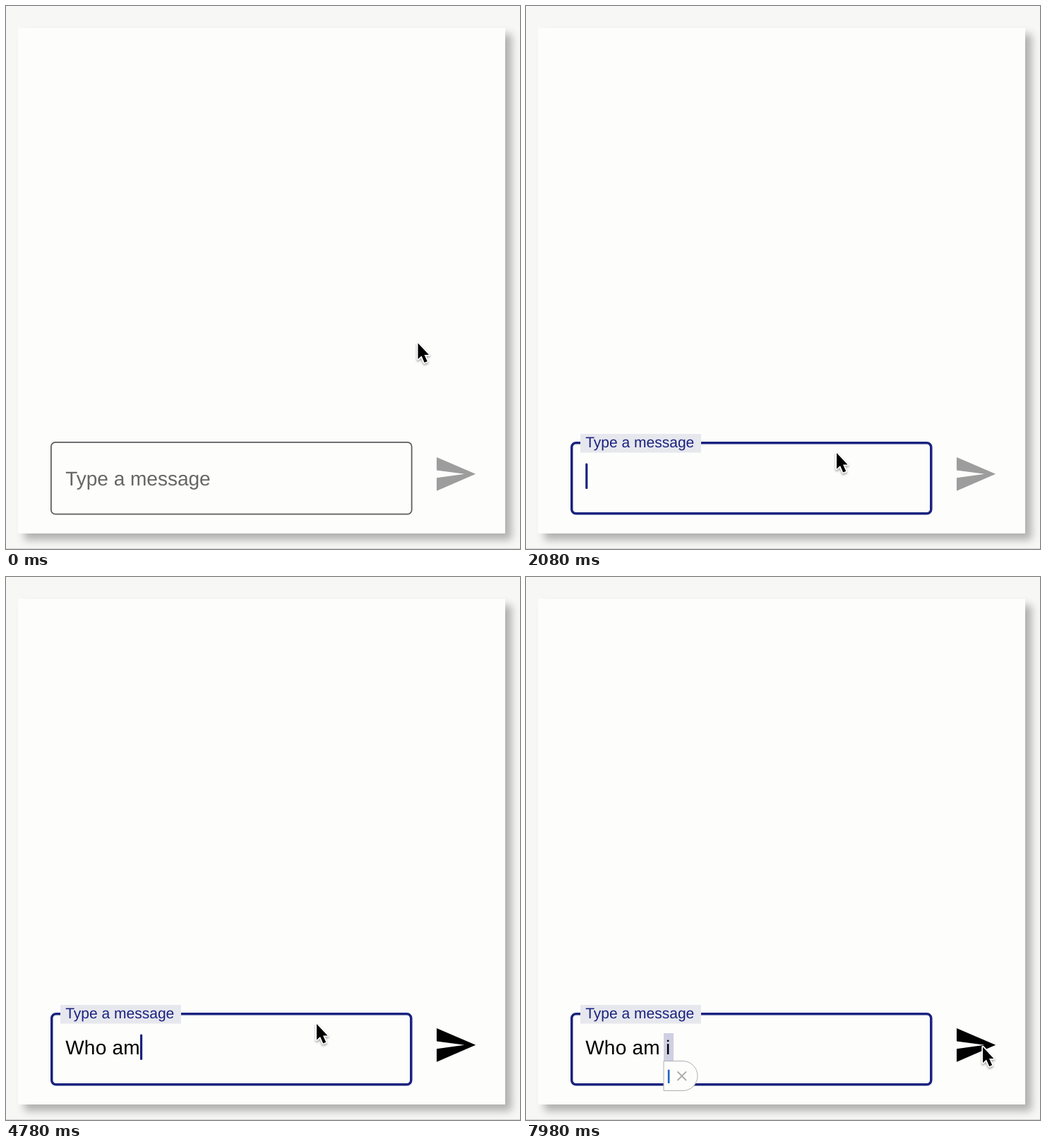
An HTML page for the animation above (8 s loop, 728 by 769 pixels).

```html
<!DOCTYPE html>
<html lang="en">
<head>
<meta charset="utf-8">
<title>Chat input</title>
<style>
  html, body { margin: 0; width: 100%; height: 100%; overflow: hidden; background: #f7f7f6; }
  .card {
    position: absolute; left: 17px; top: 31px; width: 690px; height: 716px;
    background: #fdfdfc; box-shadow: 9px 9px 11px rgba(0, 0, 0, .29);
  }
  svg { position: absolute; left: 0; top: 0; display: block; }
  text {
    font-family: "Liberation Sans", Arial, sans-serif; font-size: 28px;
    white-space: pre; text-rendering: geometricPrecision;
  }
  #arrow { filter: drop-shadow(0 2px 1.5px rgba(0, 0, 0, .35)); }
</style>
</head>
<body>
<div class="card"></div>
<svg width="728" height="769" viewBox="0 0 728 769">
  <path d="M0 768.5H728" stroke="#d2d2d2"/>
  <rect id="field" fill="none"/>
  <rect id="notch" y="606" height="26.5" fill="#e7e7ee"/>
  <text id="label">Type a message</text>
  <rect id="mark" x="195" y="646" width="14" height="39" fill="#cfcfe4"/>
  <text id="value" x="84.2" y="676" letter-spacing=".25"></text>
  <rect id="caret" y="647.5" width="3.2" height="36.5" rx="1.5" fill="#1a237e"/>
  <g id="popup">
    <path d="M195 685.5H222A20.5 20.5 0 0 1 222 727.5H195Z" fill="#fdfdfc" stroke="#b0b0b0"/>
    <text x="198.2" y="717" fill="#1f66c4">I</text>
    <path d="M214.5 700.5L227 713M227 700.5L214.5 713" stroke="#ababab" stroke-width="1.8"/>
  </g>
  <path id="send" transform="translate(604.7 631) scale(2.63 2.655)" d="M2 21L23 12 2 3V10L17 12 2 14Z"/>
  <path id="arrow" d="M0 0V22.5L5 18L9.2 27.5L13.2 25.8L9 16.5H15.5Z"
        stroke="#fff" stroke-width="3.4" stroke-linejoin="round" paint-order="stroke"/>
</svg>
<script>
const LOOP = 8000, NAVY = '#1a237e';
const $ = id => document.getElementById(id);
const set = (id, attrs) => {
  for (const k in attrs) $(id).setAttribute(k, attrs[k]);
};
const show = (id, on) => set(id, { visibility: on ? 'visible' : 'hidden' });

const linear = u => u;
const easeIn = u => u ** 1.4;
const easeOut = u => 1 - (1 - u) ** 1.7;
const easeBoth = u => u * u * (3 - 2 * u);

// time, x, y, easing towards the next row
const path = [
  [280, 583.5, 477.5, easeIn],
  [680, 499.5, 555, easeOut],
  [1000, 460, 623, linear],
  [1100, 460, 623, easeOut],
  [1280, 440, 633, linear],
  [6020, 440, 633, easeBoth],
  [6280, 618, 652.5, easeOut],
  [6420, 632, 658, linear],
  [6980, 632, 658, easeBoth],
  [7720, 645, 664, linear],
  [7820, 645, 664, easeOut],
  [7980, 647, 665.5, linear]
];

// time, progress, x, colour
const floating = [
  [0, 0, 84.2, '#666'],
  [1760, .12, 83.5, '#74748a'],
  [1800, .36, 83, '#8084a6'],
  [1840, .667, 82, '#8c90c2'],
  [1940, 1, 84.2, NAVY]
];

const typing = [
  [0, ''], [2700, 'W'], [2920, 'Wh'], [3160, 'Who'], [3800, 'Who '],
  [4280, 'Who a'], [4560, 'Who am'], [4880, 'Who am '], [5120, 'Who am i']
];

const blinkOff = [[2200, 2600], [5580, 6020], [6420, 6980], [7480, LOOP]];

const rowAt = (rows, t) => rows.findLast(r => r[0] <= t) || rows[0];

function cursorAt(t) {
  const a = rowAt(path, t);
  const b = path[path.indexOf(a) + 1];
  if (!b || t <= a[0]) return [a[1], a[2]];
  const u = a[3]((t - a[0]) / (b[0] - a[0]));
  return [a[1] + (b[1] - a[1]) * u, a[2] + (b[2] - a[2]) * u];
}

function draw(t) {
  const focused = t >= 1680;
  const w = focused ? 3.5 : 1.75;
  set('field', {
    x: 63 + w / 2, y: 617 + w / 2, width: 512.5 - w, height: 103.5 - w, rx: 6,
    stroke: focused ? NAVY : '#5c5c5c', 'stroke-width': w
  });

  const [, p, x, fill] = rowAt(floating, t);
  set('notch', { x: 162.5 - 85.5 * p, width: 171 * p });
  set('label', { transform: `translate(${x} ${679 - 54 * p}) scale(${1 - p / 4})`, fill });

  const text = rowAt(typing, t)[1];
  if ($('value').textContent !== text) $('value').textContent = text;
  set('caret', { x: 84.2 + (text ? $('value').getComputedTextLength() : 0) });
  show('caret', focused && !blinkOff.some(([a, b]) => t >= a && t < b));

  const suggesting = t >= 5280;
  show('mark', suggesting);
  show('popup', suggesting);
  set('send', { fill: t < 3480 ? '#9d9d9d' : '#000' });
  set('arrow', { transform: `translate(${cursorAt(t)})` });
}

const start = performance.now();
function tick() {
  draw((performance.now() - start) % LOOP);
  requestAnimationFrame(tick);
}
tick();
</script>
</body>
</html>
```
